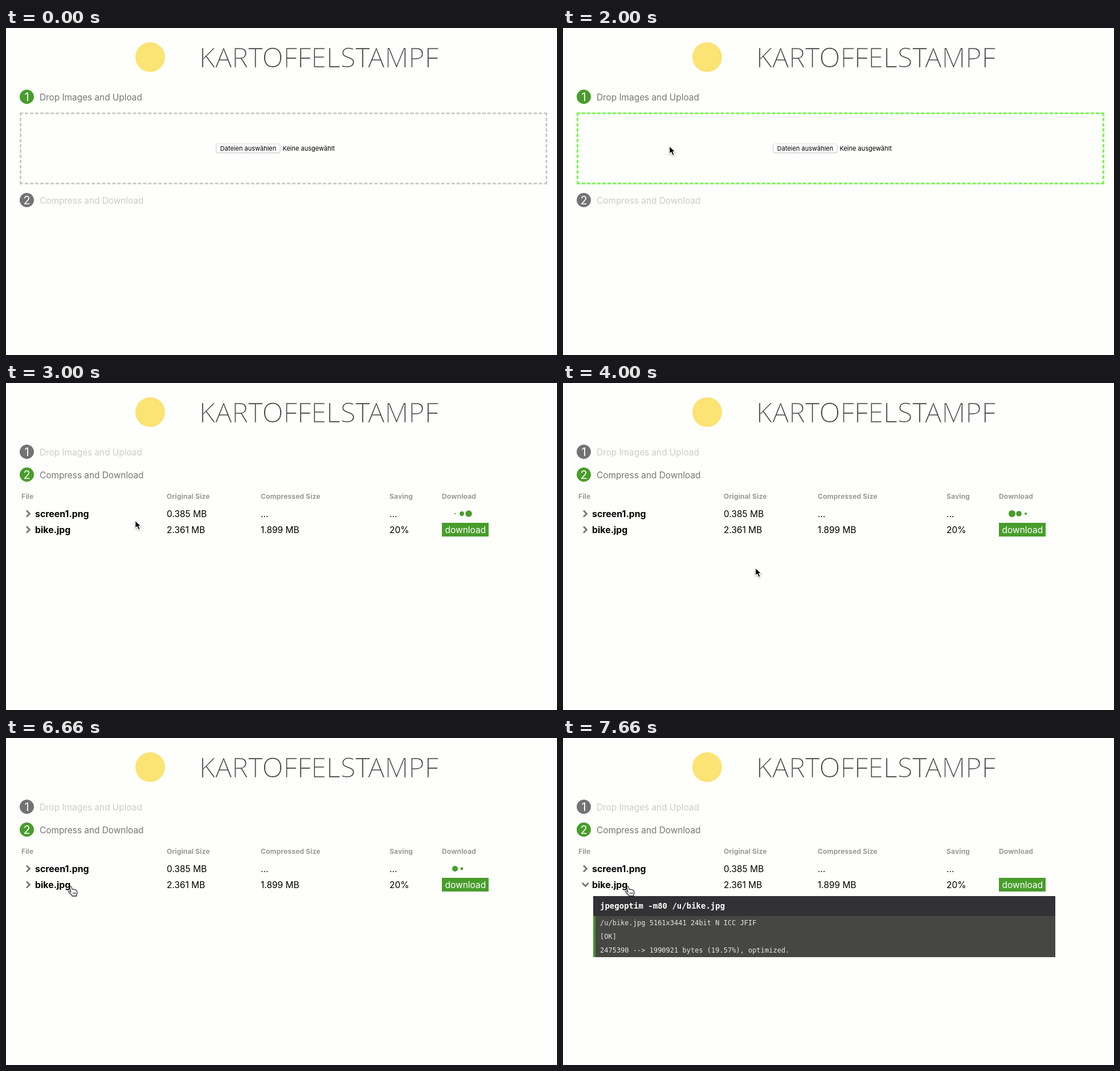
Animation of 967x573 px, one loop 8 s. Source, as an HTML page:

```html
<!DOCTYPE html>
<html lang="en">
<head>
<meta charset="utf-8">
<title>Kartoffelstampf</title>
<style>
  html, body { margin: 0; width: 100%; height: 100%; overflow: hidden; background: #fefefc; }
  svg { display: block; width: 100vw; height: 100vh; }
  text { font-family: Inter, "Noto Sans", sans-serif; font-size: 15.5px; white-space: pre; }
  .title { font-family: "Open Sans", "Noto Sans", sans-serif; font-size: 48.5px; font-weight: 300;
    fill: #444446; stroke: #fefefc; stroke-width: .7px; }
  .digit { font-size: 20px; fill: #fff; text-anchor: middle; }
  .step { letter-spacing: -.08px; }
  .head { font-size: 12px; font-weight: 700; letter-spacing: .16px; fill: #999; }
  .name { font-size: 15.9px; font-weight: 700; }
  .small { font-size: 11px; }
  .tiny { font-size: 5.2px; fill: #555; }
  .command { font: bold 14px "DejaVu Sans Mono", monospace; fill: #fff; }
  .output { font: 12px "DejaVu Sans Mono", monospace; fill: #e4e4e2; }
  .chevron { fill: none; stroke: #757575; stroke-width: 2.8; }
</style>
</head>
<body>
<svg id="stage" viewBox="0 0 967 573" preserveAspectRatio="none">
  <defs>
    <linearGradient id="badgeFill" x2="0" y2="1">
      <stop offset="0" stop-color="#45bd48"/><stop offset="1" stop-color="#078a12"/>
    </linearGradient>
    <filter id="shadow" x="-50%" y="-50%" width="200%" height="200%">
      <feDropShadow dx="0" dy="1" stdDeviation="1" flood-opacity=".45"/>
    </filter>
  </defs>

  <circle cx="253" cy="51" r="26" fill="#fbe374"/>
  <text class="title" x="549" y="69" text-anchor="middle">KARTOFFELSTAMPF</text>

  <g id="steps"></g>

  <g id="dropZone">
    <g id="border" fill="none" stroke-width="3">
      <path d="M24 149.5H950M24 272.5H950" stroke-dasharray="6 3.02"/>
      <path d="M25.5 148V274M948.5 148V274" stroke-dasharray="6 3.23"/>
    </g>
    <rect x="368.5" y="203.5" width="113" height="16" rx="3.5" fill="#d0d0d0"/>
    <rect x="369" y="203" width="112" height="15.5" rx="3" fill="#fff" stroke="#d2d2d2" stroke-width=".8"/>
    <text class="small" x="375.8" y="215">Dateien auswählen</text>
    <text class="small" x="485.5" y="215">Keine ausgewählt</text>
  </g>

  <g id="table"></g>

  <g id="terminal">
    <rect x="53" y="277" width="811" height="107" fill="#464644"/>
    <rect x="53" y="277" width="811" height="35" fill="#323234"/>
    <rect x="53" y="312" width="4" height="72" fill="#3f9428"/>
    <text class="command" x="65" y="299">jpegoptim -m80 /u/bike.jpg</text>
    <text class="output" x="65" y="328">/u/bike.jpg 5161x3441 24bit N ICC JFIF</text>
    <text class="output" x="65" y="352">[OK]</text>
    <text class="output" x="65" y="376">2475390 --> 1990921 bytes (19.57%), optimized.</text>
  </g>

  <g id="ghost" opacity=".85">
    <rect x="1" y="1" width="3" height="4" fill="#eee"/>
    <rect x="1" y="7.5" width="2.5" height="4" fill="#bbb"/>
    <text class="tiny" x="5" y="4.6">bike.jpg</text>
    <text class="tiny" x="5" y="11.2">screen1.png</text>
  </g>

  <g id="arrow" filter="url(#shadow)">
    <path d="M.8 1V14.8L4 11.8L6.4 17.2L9.2 16L7 10.8H11.2Z" fill="#000" stroke="#fff" stroke-width="1.2"/>
  </g>
  <g id="badge">
    <g filter="url(#shadow)"><circle cx="10" cy="23" r="9.2" fill="url(#badgeFill)" stroke="#cfe8cf" stroke-width=".8"/></g>
    <path d="M10 18V28M5 23H15" stroke="#fff" stroke-width="2.4"/>
  </g>
  <g id="hand" filter="url(#shadow)" stroke="#333" stroke-width="1.1" stroke-linejoin="round">
    <path d="M5 11.5L3.2 3.2Q2.7 1.2 4.1 .9Q5.4 .6 6 2.4L7.2 6.6Q8.8 5.3 9.9 6.8Q11.6 5.8 12.6 7.4Q14.6 6.8 15.2 9
      Q16.4 12.6 14.8 15L14.6 17.6H7.4Q6.6 15.6 3.4 13.2L1 10.7Q.4 9.2 2 9Q3.4 9.2 5 11.5Z" fill="#fff"/>
    <path d="M8.5 11.5L9 15M10.7 11.3L11 15M12.8 11L13 14.8" fill="none" stroke-width=".9"/>
  </g>
</svg>
<script>
const LOOP = 8000;
const GREEN = "#489d2c";
const byId = id => document.getElementById(id);
const show = (id, on) => byId(id).setAttribute("visibility", on ? "visible" : "hidden");
const move = (id, x, y) => byId(id).setAttribute("transform", `translate(${x} ${y})`);
const label = (x, y, text, cls = "", fill = "") =>
  `<text class="${cls}" x="${x}" y="${y}"${fill && ` fill="${fill}"`}>${text}</text>`;

const ticks = [0];
for (let second = 1; second < 8; second++) ticks.push(second * 1000, second * 1000 + 330, second * 1000 + 660);

const DROPPED = 2330, LISTED = 2660, COMPRESSED = 3000, OPENED = 7000;

// Start time, pointer shape and position
const pointer = [
  [0, "", 0, 0],
  [1000, "arrow", 91, 169],
  [1330, "arrow", 186, 206],
  [2330, "arrow", 186, 207],
  [2660, "arrow", 194, 213],
  [3000, "arrow", 226, 240],
  [3330, "arrow", 337, 324],
  [4000, "arrow", 337, 323],
  [4330, "arrow", 320, 306],
  [4660, "arrow", 175, 266],
  [5000, "hand", 117, 238],
  [5330, "hand", 112, 228],
  [5660, "hand", 111, 228],
  [6000, "hand", 109, 239],
  [6330, "hand", 107, 268],
  [6660, "hand", 109, 259]
];

function easeInOut(x) {
  let low = 0, high = 1;
  for (let i = 0; i < 20; i++) {
    const u = (low + high) / 2, v = 1 - u;
    if (1.26 * v * v * u + 1.74 * v * u * u + u ** 3 < x) low = u; else high = u;
  }
  return low * low * (3 - 2 * low);
}

function bounce(ms) {
  const phase = (ms % 1400) / 560;
  return phase < 2 ? easeInOut(phase < 1 ? phase : 2 - phase) : 0;
}

function spinner(x, y, t) {
  return [0, 1, 2].map(i => {
    const r = 6 * bounce(t + 430 + (2 - i) * 160);
    return `<circle cx="${x + 23 + 12 * i}" cy="${y}" r="${r.toFixed(2)}" fill="${GREEN}"/>`;
  }).join("");
}

function step(number, y, text, active) {
  return `<circle cx="36.5" cy="${y}" r="12.5" fill="${active ? GREEN : "#737373"}"/>` +
    label(36.5, y + 7.5, number, "digit") +
    label(59, y + 6.5, text, "step", active ? "#777" : "#ccc");
}

function row(cols, y, file, size, result, open, t) {
  const chevron = open ? `M33.8 ${y - 3}L39.3 ${y + 2.5}L44.8 ${y - 3}` : `M36 ${y - 5.5}L41.5 ${y}L36 ${y + 5.5}`;
  const base = y + 6;
  const action = result
    ? `<rect x="${cols[4]}" y="${y - 12}" width="82" height="24" fill="${GREEN}"/>` +
      label(cols[4] + 5.5, base, "download", "", "#fff")
    : spinner(cols[4], y, t);
  const [compressed, saving] = result || ["...", "..."];
  return `<path class="chevron" d="${chevron}"/>` + label(51, base, file, "name") +
    label(cols[1], base, size) + label(cols[2], base, compressed) + label(cols[3], base, saving) + action;
}

function table(t) {
  if (t < DROPPED) return "";
  const cols = t < LISTED ? [27, 98, 325, 636, 762]
    : t < COMPRESSED ? [27, 289, 459, 692, 787]
    : [27, 282, 447, 673, 765];
  let out = ["File", "Original Size", "Compressed Size", "Saving", "Download"]
    .map((text, i) => label(cols[i], 203, text, "head")).join("");
  if (t >= LISTED) {
    out += row(cols, 229, "screen1.png", "0.385 MB", null, false, t);
    out += row(cols, 257, "bike.jpg", "2.361 MB", t >= COMPRESSED && ["1.899 MB", "20%"], t >= OPENED, t);
  }
  return out;
}

function draw(t) {
  const dropped = t >= DROPPED;
  byId("steps").innerHTML = step(1, 120.5, "Drop Images and Upload", !dropped) +
    step(2, dropped ? 160.5 : 301.5, "Compress and Download", dropped);
  show("dropZone", !dropped);
  byId("border").setAttribute("stroke", t < 1000 ? "#ccc" : "#74fa4c");
  byId("table").innerHTML = table(t);
  show("terminal", t >= OPENED);

  const [, shape, x, y] = pointer.findLast(p => p[0] <= t);
  for (const id of ["arrow", "hand"]) {
    show(id, id === shape);
    move(id, x, y);
  }
  show("badge", t >= 1000 && t < 2000);
  move("badge", x, y);
  show("ghost", t >= 1000 && t < 1660);
  if (t < 1330) move("ghost", 63, 164); else move("ghost", 180, 206);
}

let shown = -1;
function frame() {
  const now = performance.now() % LOOP;
  const t = ticks.findLast(tick => tick <= now);
  if (t !== shown) draw(shown = t);
  requestAnimationFrame(frame);
}
frame();
</script>
</body>
</html>
```
